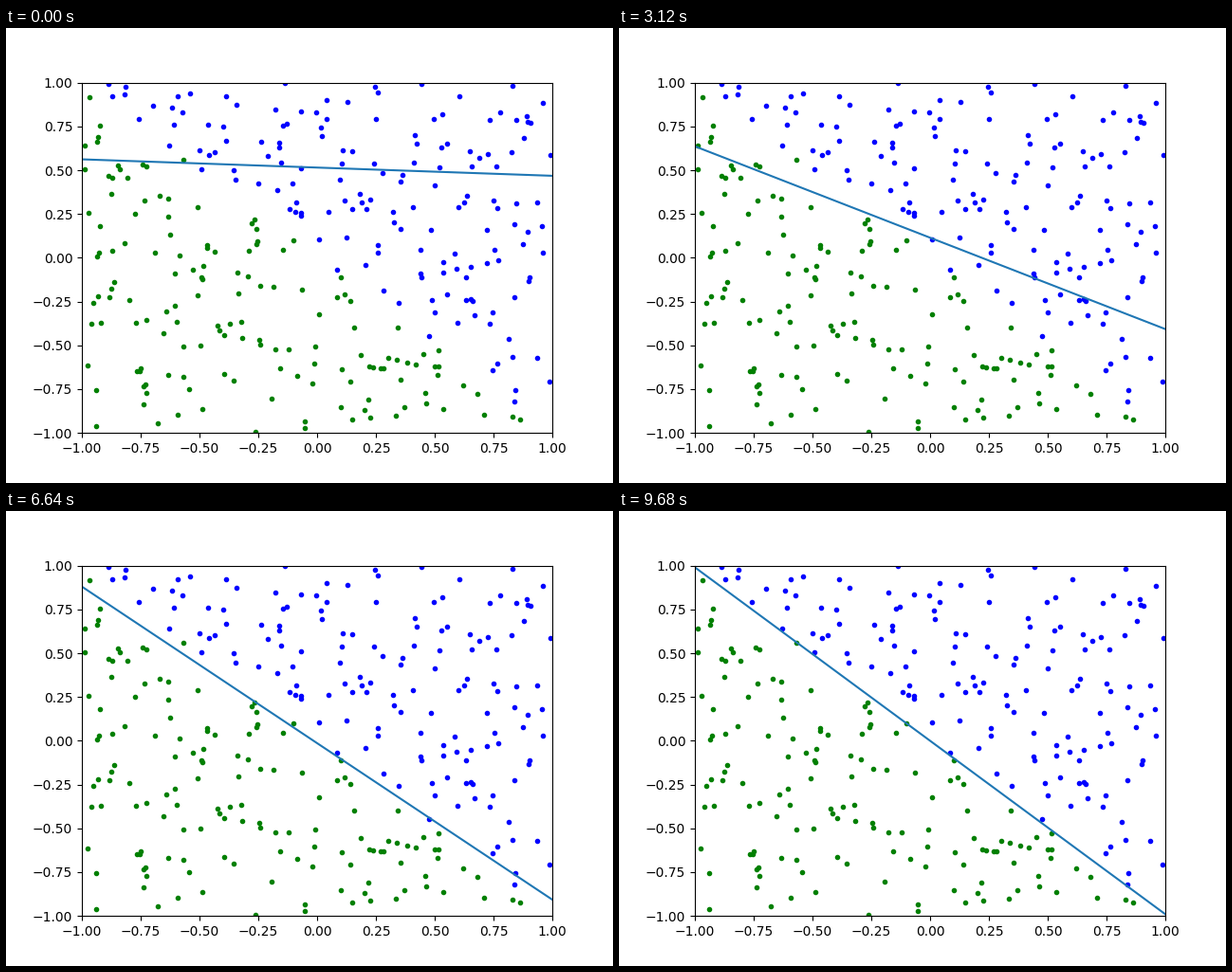
Write a matplotlib script that moves like this. It is 640 px wide and 480 px high and loops after 9840 ms.

```python
import numpy as np
import matplotlib.pyplot as plt
from matplotlib.animation import FuncAnimation

FRAMES = 123
STEP_MS = 80
POINTS = 298

# A few points that the line finally settles between
NEAR = [(-.871, .922), (-.758, .79), (-.629, .64), (-.568, .56),
        (-.49, .505), (-.265, .217), (-.1, .1), (.085, -.068),
        (.102, -.112), (.474, -.446), (.516, -.528), (.84, -.82)]

# Key poses of the line: frame, then its height at x = -1 and x = 1
KEYS = np.array([(0, .562, .468), (27, .572, -.195), (52, .722, -.595),
                 (68, .808, -.792), (83, .88, -.907), (108, .974, -.992),
                 (121, .99, -.99)])
TIMES, HEIGHTS = KEYS[:, 0], KEYS[:, 1:]
SPEEDS = np.gradient(HEIGHTS, TIMES, axis=0, edge_order=2)


def scatter(count, seed):
    """Uniform points, with only the chosen ones close to x + y = 0."""
    pts = np.random.default_rng(seed).uniform(-1, 1, (2 * count, 2))
    pts = pts[abs(pts.sum(axis=1)) > .05]
    return np.vstack([NEAR, pts])[:count]


def line_ends(t):
    """Cubic easing between the key poses."""
    i = min(np.searchsorted(TIMES, t, side="right"), len(TIMES) - 1) - 1
    span = TIMES[i + 1] - TIMES[i]
    s = (t - TIMES[i]) / span
    ease = s * s * (3 - 2 * s)
    pose = (1 - ease) * HEIGHTS[i] + ease * HEIGHTS[i + 1]
    drift = s * (1 - s) * ((1 - s) * SPEEDS[i] - s * SPEEDS[i + 1])
    return pose + span * drift


fig, ax = plt.subplots(figsize=(6.4, 4.8), dpi=100)
ax.set(xlim=(-1, 1), ylim=(-1, 1))
pts = scatter(POINTS, seed=7)
above = pts.sum(axis=1) > 0
ax.plot(*pts[above].T, "b.")
ax.plot(*pts[~above].T, "g.")
line, = ax.plot([-1, 1], HEIGHTS[0], color="C0")


def update(frame):
    line.set_ydata(line_ends(min(frame, TIMES[-1])))
    return line,


anim = FuncAnimation(fig, update, frames=FRAMES, interval=STEP_MS,
                     repeat=True, repeat_delay=0)
plt.show()
```
